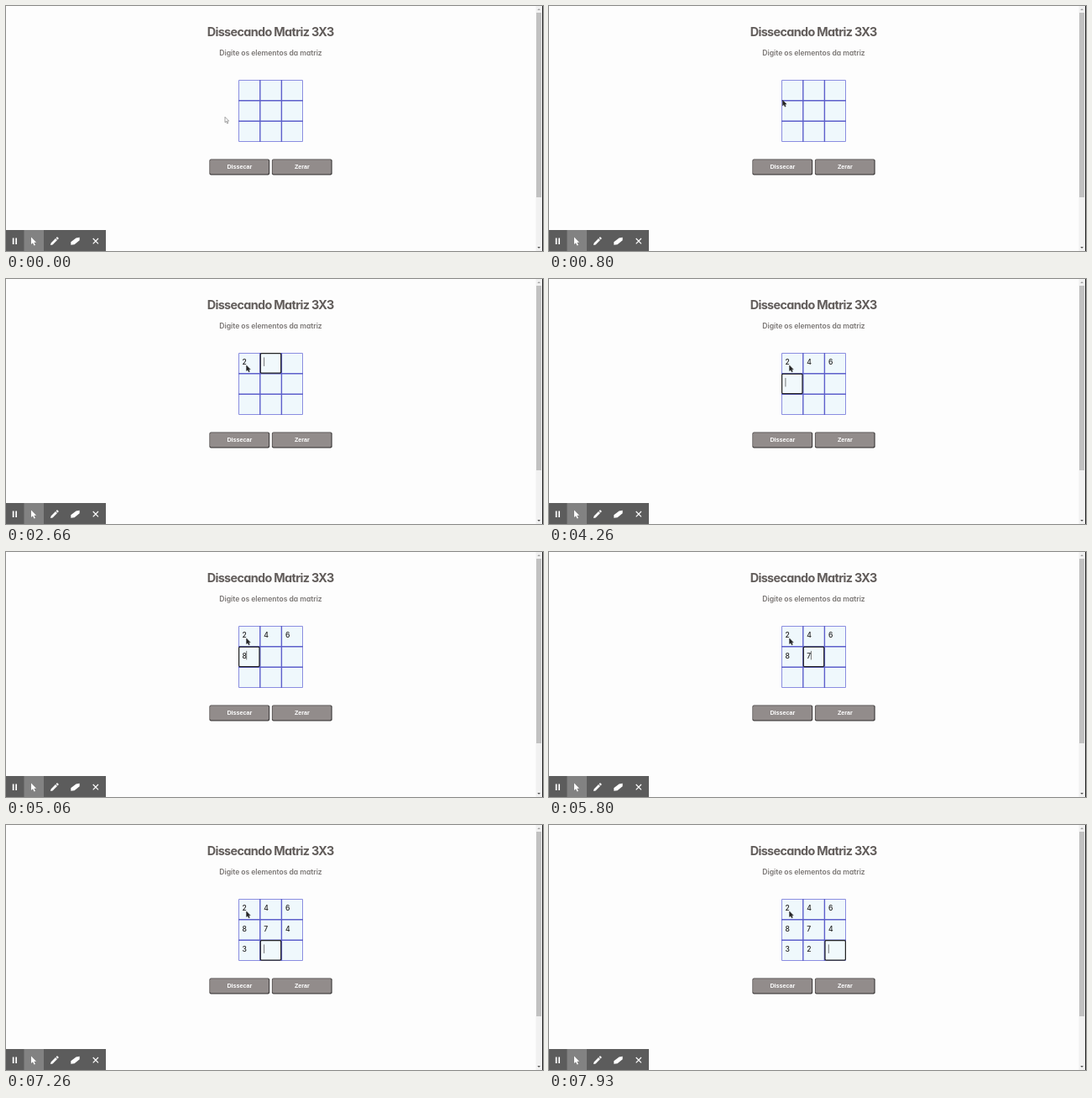
An HTML page for the animation above (8 s loop, 640 by 292 pixels).

```html
<!DOCTYPE html>
<html lang="pt">
<head>
<meta charset="utf-8">
<style>
  html, body { margin: 0; width: 100%; height: 100%; overflow: hidden; background: #fdfdfd; }
  svg { display: block; }
  text { font-family: Inter, sans-serif; font-feature-settings: "cv11"; }
  .heading { font-weight: 700; font-size: 14.4px; letter-spacing: -.045em; fill: #625d5b; text-anchor: middle; }
  .hint { font-weight: 600; font-size: 8.6px; letter-spacing: -.005em; fill: #7a7674; text-anchor: middle; }
  .label { font: bold 7.2px "Liberation Sans", Arial, sans-serif; fill: #fff; text-anchor: middle; }
  .digit { font-weight: 500; font-size: 8.6px; fill: #222; }
</style>
</head>
<body>
<svg width="640" height="292" viewBox="0 0 640 292">
  <rect width="640" height="292" fill="#fdfdfd"/>
  <text class="heading" x="315.2" y="35.8">Dissecando Matriz 3X3</text>
  <text class="hint" x="315.5" y="59.3">Digite os elementos da matriz</text>

  <g id="grid">
    <path d="M277.5 88.5h76v73h-76z" fill="#eff8fc" stroke="#8a8de0"/>
    <path d="M302.8 88v74M328.4 88v74M277 112.8h77M277 137.2h77" stroke="#5c5fcb" stroke-width="1.4"/>
  </g>
  <rect id="focus" width="24.4" height="23.4" rx="1.4" fill="#f1f9fc" stroke="#222" stroke-width="1.2"/>
  <g id="digits"></g>
  <path id="caret" d="M0 0v10.5" stroke="#555" stroke-width=".8"/>

  <g id="buttons"></g>

  <g id="scrollbar">
    <path d="M631.5 0h7.5v292h-7.5z" fill="#f1f1f1"/>
    <path d="M632 8h6v220h-6z" fill="#c1c1c1"/>
    <path d="M633.3 5l1.8-2 1.8 2z" fill="#a0a0a0"/>
    <path d="M633.3 287l1.8 2 1.8-2z" fill="#505050"/>
    <path d="M639 0h1v292h-1z" fill="#222"/>
  </g>

  <g id="toolbar" fill="#fff">
    <path d="M0 267h119v25H0z" fill="#5c5c5c"/>
    <path d="M21.5 267H45v25H21.5z" fill="#828282"/>
    <path d="M7.8 276.5h1.7v7.5H7.8zM11.3 276.5H13v7.5h-1.7z"/>
    <path d="M30 275.5v8.5l2-1.8 1.5 3.3 1.4-.6-1.5-3.2h2.7z"/>
    <path d="M53 285l.6-2.6 5.4-5.4 2 2-5.4 5.4zM59.6 276.4l.9-.9q.5-.4 1 0l1 1q.4.5 0 1l-.9.9z"/>
    <path d="M77.3 281.2l6.2-4.6 4.2-.8v3.4l-6.2 5-4.2.5z"/>
    <path d="M103.7 277l6.3 6.3m0-6.3l-6.3 6.3" stroke="#fff" stroke-width="1.2"/>
  </g>

  <path id="pointer" d="M0 0v6.4l1.5-1.2 1.2 2.6 1-.5-1.1-2.5h2z" stroke-width=".6"/>
</svg>
<script>
const LOOP = 8000;
const VALUES = [2, 4, 6, 8, 7, 4, 3, 2];
const FOCUS_AT = [1060, 2600, 3200, 4060, 5330, 5930, 6460, 7200, 7730];
const TYPED_AT = [1460, 2860, 3600, 4730, 5600, 6200, 6930, 7460];
// Pointer stops: time, x, y
const STOPS = [[60, 261, 132.3], [330, 270, 122], [530, 270, 122], [1060, 286.6, 103]];

const $ = id => document.getElementById(id);
const cellX = i => 277.3 + (i % 3) * 25.7;
const cellY = i => 88.4 + Math.floor(i / 3) * 24.5;
const move = (el, x, y) => el.setAttribute('transform', `translate(${x} ${y})`);
const show = (el, on) => el.setAttribute('visibility', on ? 'visible' : 'hidden');

VALUES.forEach((value, i) => {
  $('digits').innerHTML += `<text class="digit" x="${cellX(i) + 4.2}" y="${cellY(i) + 13.8}">${value}</text>`;
});
[['Dissecar', 242.4], ['Zerar', 316.9]].forEach(([label, x]) => {
  $('buttons').innerHTML += `<rect x="${x}" y="182.6" width="71.8" height="18.8" rx="2" fill="#454242"/>
    <rect x="${x + .7}" y="183.3" width="69.9" height="16.9" rx="1.4" fill="#928c8b"/>
    <text class="label" x="${x + 36}" y="194.4">${label}</text>`;
});

function pointerAt(t) {
  const next = STOPS.findIndex(stop => stop[0] > t);
  if (next === 0) return STOPS[0].slice(1);
  if (next < 0) return STOPS.at(-1).slice(1);
  const [t0, x0, y0] = STOPS[next - 1], [t1, x1, y1] = STOPS[next];
  const k = (t - t0) / (t1 - t0);
  return [x0 + (x1 - x0) * k, y0 + (y1 - y0) * k];
}

function draw(now) {
  const t = now % LOOP;
  const active = FOCUS_AT.filter(time => time <= t).length - 1;
  const typed = TYPED_AT[active] <= t;
  [...$('digits').children].forEach((digit, i) => show(digit, t >= TYPED_AT[i]));

  const focused = active >= 0;
  show($('focus'), focused);
  const lastInput = typed ? TYPED_AT[active] : FOCUS_AT[active];
  show($('caret'), focused && (t - lastInput) % 1000 < 500);
  if (focused) {
    move($('focus'), cellX(active) + .3, cellY(active) + .3);
    move($('caret'), cellX(active) + (typed ? 9.4 : 4.6), cellY(active) + 5);
  }

  const [x, y] = pointerAt(t), inside = x > 277;
  move($('pointer'), x, y);
  $('pointer').setAttribute('fill', inside ? '#222' : '#fff');
  $('pointer').setAttribute('stroke', inside ? '#333' : '#666');
  show($('pointer'), t < TYPED_AT[0] || t >= FOCUS_AT[1]);
  requestAnimationFrame(draw);
}
requestAnimationFrame(draw);
</script>
</body>
</html>
```
